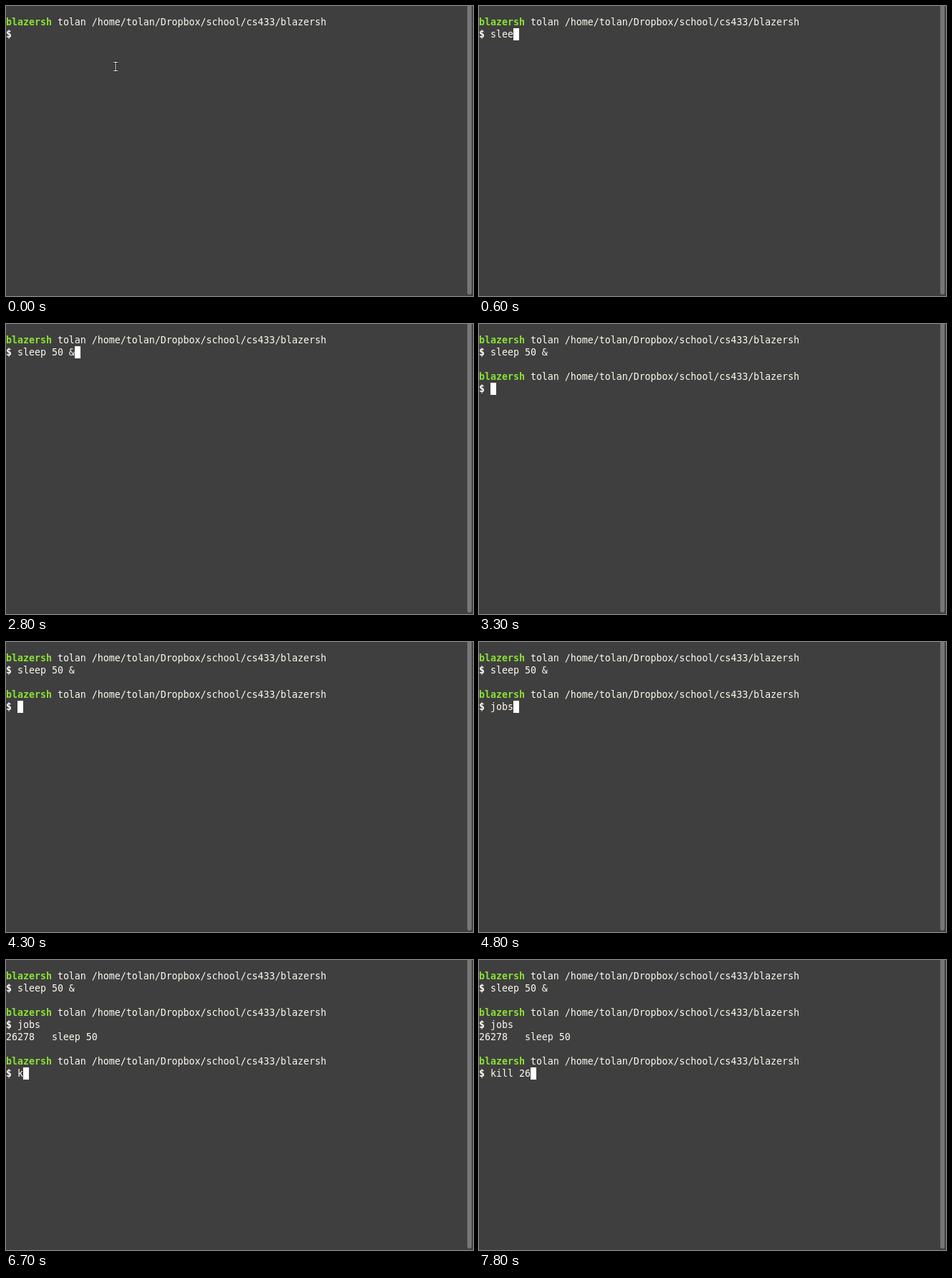
An HTML page for the animation above (8 s loop, 652 by 405 pixels).

```html
<!DOCTYPE html>
<html lang="en">
<head>
<meta charset="utf-8">
<title>Terminal</title>
<style>
  html, body { margin: 0; width: 100%; height: 100%; overflow: hidden; background: #3f3f3f; }
  /* 13.288px gives this font an advance of exactly 8px */
  #screen {
    position: absolute; left: 0; top: 14px; margin: 0;
    font: 13.288px/17px "DejaVu Sans Mono", monospace;
    color: #fffaf0; white-space: pre;
  }
  #screen i { font-style: normal; font-weight: bold; color: #8ae234; }
  #cursor { position: absolute; width: 8px; height: 17px; background: #fff; }
  #bar { position: absolute; left: 644px; top: -6px; width: 6px; height: 409px; border-radius: 3px; background: #777; }
  #pointer { position: absolute; left: 148px; top: 75px; }
</style>
</head>
<body>
<pre id="screen"></pre>
<div id="cursor"></div>
<div id="bar"></div>
<svg id="pointer" width="10" height="19" fill="none">
  <path id="beam" d="M2 3.5H4.5M5.5 3.5H8M5 4V15M2 15.5H4.5M5.5 15.5H8" stroke="#111" stroke-width="3"/>
  <path d="M2 3.5H8M5 4V15M2 15.5H8" stroke="#fff"/>
</svg>
<script>
const LOOP = 8000, CELL = 8, ROW = 17, TOP = 14;
const $ = id => document.getElementById(id);
const prompt = "<i>blazersh</i> tolan /home/tolan/Dropbox/school/cs433/blazersh\n<b>$</b> ";

// Each session: finished output above, its prompt row, and [time, typed text, cursor hidden]
const sessions = [
  { before: "", row: 1, steps: [
    [0, "", true], [300, "s"], [400, "sl"], [600, "slee"], [800, "sleep"],
    [1000, "sleep "], [1100, "sleep 5"], [1200, "sleep 50"], [1600, "sleep 50 "],
    [2200, "sleep 50 ", true], [2300, "sleep 50 "], [2800, "sleep 50 &"]] },
  { before: prompt + "sleep 50 &amp;\n\n", row: 4, steps: [
    [3300, ""], [3800, "", true], [4300, ""], [4500, "jo"], [4800, "jobs"]] },
  { before: prompt + "sleep 50 &amp;\n\n" + prompt + "jobs\n26278   sleep 50\n\n", row: 8, steps: [
    [5200, ""], [5800, "", true], [6700, "k"], [6900, "ki"], [7200, "kill"],
    [7400, "kill "], [7800, "kill 26"]] }
];
const timeline = sessions.flatMap(({ before, row, steps }) =>
  steps.map(([time, typed, hidden]) => ({ time, typed, hidden, before, row })));

let shown;
function draw(now) {
  const t = now % LOOP;
  $("pointer").style.display = t < 200 ? "block" : "none";
  const state = timeline.findLast(s => s.time <= t);
  if (state !== shown) {
    shown = state;
    $("screen").innerHTML = state.before + prompt + state.typed.replace("&", "&amp;");
    const cursor = $("cursor").style;
    cursor.left = (2 + state.typed.length) * CELL + "px";
    cursor.top = TOP + state.row * ROW + "px";
    cursor.display = state.hidden ? "none" : "block";
  }
}

const start = performance.now();
function tick() {
  draw(performance.now() - start);
  requestAnimationFrame(tick);
}
tick();
</script>
</body>
</html>
```
